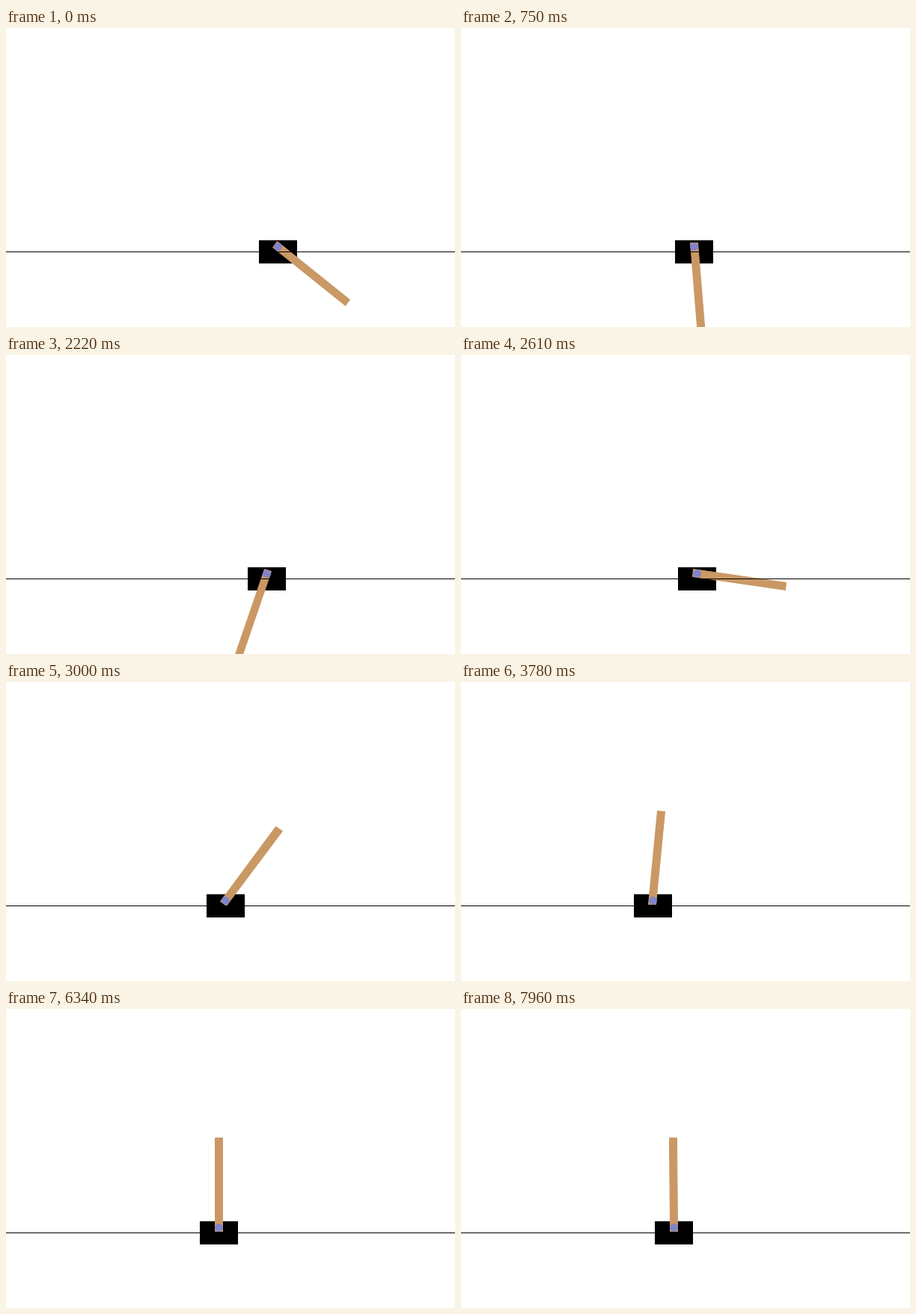
An HTML page for the animation above (8 s loop, 600 by 400 pixels).

```html
<!DOCTYPE html>
<html lang="en">
<head>
<meta charset="utf-8">
<title>Cart and pole swing-up</title>
<style>
  html, body { margin: 0; width: 100%; height: 100%; overflow: hidden; background: #fff; }
  svg { display: block; width: 600px; height: 400px; }
</style>
</head>
<body>
<svg viewBox="0 0 600 400">
  <rect id="cart" y="284" width="51" height="31"/>
  <polygon id="pole" fill="#ca9865" stroke="#ca9865"/>
  <circle id="axle" cy="292.5" r="5.4" fill="#8184cb"/>
  <rect y="299" width="600" height="1"/>
</svg>
<script>
const LOOP = 8000, STEP = 30;
const REST = 211, SWAY_PERIOD = 36;

// Key poses of the swing-up: step, cart x, pole tilt in degrees clockwise from upright
const POSES = [
  [0, 363.3, 128.9], [9, 345, 129.3], [20, 322.1, 157], [32, 297.2, 202],
  [40, 280.9, 225.1], [44, 274, 233], [48, 274.6, 241.2], [54, 290.6, 250.5],
  [59, 319.7, 253], [66, 350, 242.5], [74, 348.6, 198.8], [81, 330, 140.8],
  [87, 315.2, 98], [93, 304, 64], [100, 293.45, 36.6], [108, 277.6, 22.9],
  [122, 257, 8], [135, 259.4, 1.5], [161, 276.6, -0.45], [189, 284.7, -0.2],
  [200, 284.4, 0]
];

// Slope at pose i of the parabola through it and its neighbours
function slope(i, k) {
  const last = POSES.length - 1;
  const mid = Math.min(Math.max(i, 1), last - 1);
  const [p, q, r] = POSES.slice(mid - 1, mid + 2);
  const before = (q[k] - p[k]) / (q[0] - p[0]);
  const after = (r[k] - q[k]) / (r[0] - q[0]);
  const bend = (after - before) / (r[0] - p[0]);
  return before + bend * (2 * POSES[i][0] - p[0] - q[0]);
}

// Smooth curve through column k of the poses
function curve(n, k) {
  let i = 0;
  while (i < POSES.length - 2 && n >= POSES[i + 1][0]) i++;
  const a = POSES[i], b = POSES[i + 1];
  const span = b[0] - a[0], u = Math.min(1, (n - a[0]) / span), w = 1 - u;
  return w * w * ((1 + 2 * u) * a[k] + u * span * slope(i, k)) +
         u * u * ((3 - 2 * u) * b[k] - w * span * slope(i + 1, k));
}

const [cart, pole, axle] = ['cart', 'pole', 'axle'].map(id => document.getElementById(id));
const POLE_CORNERS = [[-5, -5], [-5, 120], [5, 120], [5, -5]];

function draw(n) {
  // Once balanced, the pole only sways slightly
  const sway = (1 - Math.cos(2 * Math.PI * Math.max(0, n - REST) / SWAY_PERIOD)) / 2;
  const x = curve(n, 1) - 0.35 * sway;
  const tilt = (curve(n, 2) - 0.24 * sway) * Math.PI / 180;
  const s = Math.sin(tilt), c = Math.cos(tilt);
  const px = Math.trunc(x);

  cart.setAttribute('x', px - 25);
  axle.setAttribute('cx', px + 0.5);
  // Corners snap to pixel centres, measured upwards from the bottom row
  pole.setAttribute('points', POLE_CORNERS.map(([across, along]) => {
    const cx = Math.trunc(x + across * c + along * s);
    const cy = Math.trunc(107.5 - across * s + along * c);
    return `${cx + 0.5},${399.5 - cy}`;
  }).join(' '));
}

const start = performance.now();
function tick() {
  const t = (performance.now() - start) % LOOP;
  draw(Math.floor(t / STEP));
  requestAnimationFrame(tick);
}
tick();
</script>
</body>
</html>
```
